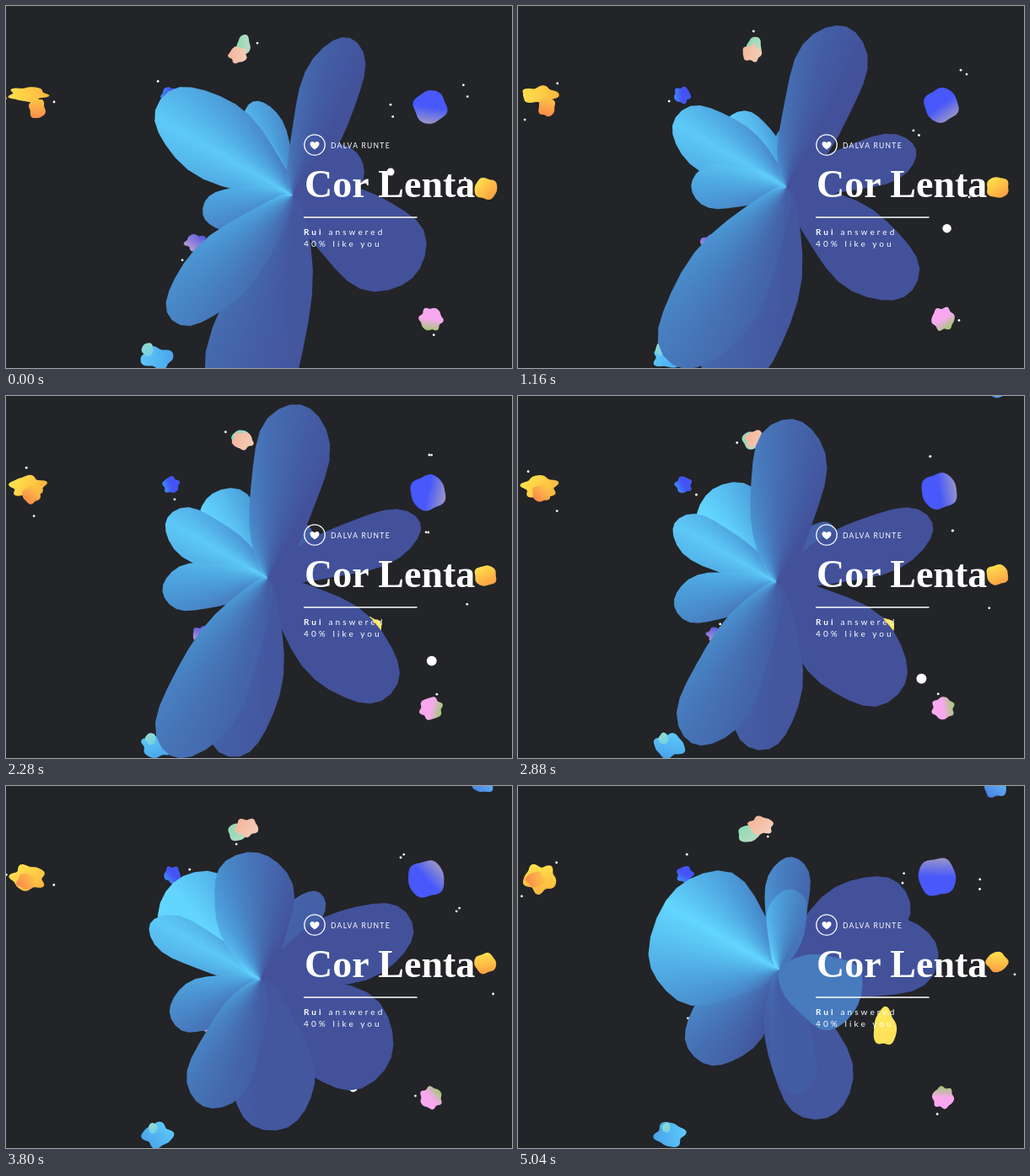
Recreate the animation shown at these times as an HTML page with a canvas. Size 600x430 px, loop 5080 ms.

```html
<!DOCTYPE html>
<html lang="en">
<head>
<meta charset="utf-8">
<style>
  html, body { margin: 0; width: 600px; height: 430px; overflow: hidden; background: #222427; }
  canvas, svg { position: absolute; left: 0; top: 0; display: block; }
  text { fill: #fff; font-family: Lato, "Open Sans", sans-serif; }
  .title { font: bold 46px "Liberation Serif", "Noto Serif", serif; }
  .artist { font-size: 8.5px; letter-spacing: 1.3px; }
  .note { font-size: 10px; letter-spacing: 3.1px; }
  .name { font-weight: bold; }
</style>
</head>
<body>
<canvas id="stage" width="600" height="430"></canvas>
<svg width="600" height="430" fill="#fff">
  <circle cx="366" cy="165" r="12.2" fill="none" stroke="#fff" stroke-width="1.3"/>
  <path d="M366 170.5C361 167 360.5 165 360.5 163.7C360.5 160.6 364.5 160 366 162.6C367.5 160 371.5 160.6 371.5 163.7C371.5 165 371 167 366 170.5Z"/>
  <text class="artist" x="385" y="168.5">DALVA RUNTE</text>
  <text class="title" x="354" y="227">Cor Lenta</text>
  <rect x="353" y="250.3" width="134.5" height="1.5"/>
  <text class="note" x="353" y="271.5"><tspan class="name">Rui</tspan> answered</text>
  <text class="note" x="353" y="286">40% like you</text>
</svg>
<script>
const ctx = document.getElementById('stage').getContext('2d');
const LOOP = 5080, TAU = Math.PI * 2, RAD = Math.PI / 180;
const { sin, cos, min, max } = Math;
const mix = (a, b, k) => a + (b - a) * k;

// Smooth curve through evenly spaced key poses; k runs from 0 to 1.
const keys = (...rows) => k => {
  const n = rows.length - 1, i = min(Math.floor(k * n), n - 1), u = k * n - i;
  const row = j => rows[min(max(j, 0), n)];
  return rows[i].map((b, j) => {
    const a = row(i - 1)[j], c = row(i + 1)[j], d = row(i + 2)[j];
    return b + u / 2 * (c - a + u * (2 * a - 5 * b + 4 * c - d + u * (3 * (b - c) + d - a)));
  });
};

// ---- flower: poses at each quarter of the loop are [angle, length, half width]
const center = keys([340, 225], [317, 215], [309, 218], [302, 230], [310, 218]);
const petals = [];
const petal = (lift, ...poses) => petals.push({ lift, pose: keys(...poses) });
const bud = (lift, a, len, w) => petal(lift, ...Array(4).fill([a, 0, 0]), [a, len, w]);

petal(-.15, [247, 121, 25], [275, 70, 20], [312, 85, 20], [304, 125, 25], [276, 135, 30]);
petal(-.2, [225, 120, 30], [233, 108, 32], [237, 125, 44], [228, 155, 56], [215, 110, 40]);
petal(0, [331, 92, 34], [344, 165, 33], [339, 196, 37], [339, 192, 48], [328, 176, 52]);
petal(0, [30, 174, 60], [40, 194, 50], [43, 200, 55], [36, 182, 66], [-7, 190, 52]);
petal(.08, [216, 194, 52], [212, 153, 40], [211, 138, 32], [207, 147, 28], [205, 110, 30]);
petal(.05, [168, 109, 28], [181, 114, 30], [170, 127, 32], [156, 116, 34], [134, 145, 47]);
petal(-.05, [103, 285, 63], [108, 245, 62], [100, 210, 46], [84, 180, 56], [72, 185, 52]);
petal(-.12, [134, 206, 42], [122, 252, 57], [118, 232, 48], [114, 165, 42], [80, 150, 30]);
petal(0, [290, 199, 39], [290, 204, 49], [278, 207, 50], [264, 152, 53], [202, 158, 90]);
bud(-.35, 279, 98, 27);
bud(-.4, 24, 104, 50);

// Colour depends on direction: bright at the upper left, indigo on the far side.
const RAMP = [[98, 214, 255], [76, 160, 220], [70, 114, 182], [66, 81, 154]];
function shade(angle, lift) {
  const d = (angle - 210 + 540) % 360 - 180;
  const p = 3 * min(max(min(d > 0 ? d / 85 : -d / 115, 1) + lift, 0), 1);
  const i = min(Math.floor(p), 2);
  return `rgb(${RAMP[i].map((c, j) => Math.round(mix(c, RAMP[i + 1][j], p - i)))})`;
}
function fan(x, y, lift) {
  const fill = ctx.createConicGradient(0, x, y);
  for (let a = 0; a <= 360; a += 15) fill.addColorStop(a / 360, shade(a, lift));
  return fill;
}

function drawFlower(k) {
  const [x, y] = center(k);
  disc(x, y, 42, fan(x, y, 0));
  petals.forEach(({ lift, pose }, id) => {
    const [angle, len, w] = pose(k);
    if (len < 1) return;
    const c = cos(angle * RAD), s = sin(angle * RAD);
    ctx.beginPath();
    for (let i = 0; i < 28; i++) {
      const q = i / 28 * TAU, along = (1 - cos(q)) / 2;
      const side = w * sin(q) * (.55 + .6 * along) * (1 + .06 * sin(4 * q + id * 2 + k * 4));
      ctx.lineTo(x + c * along * len - s * side, y + s * along * len + c * side);
    }
    ctx.fillStyle = fan(x, y, lift);
    ctx.fill();
  });
}

// ---- drifting blobs: first and last [x, y, half width, half height]
const blobs = [];
const blob = (colors, turn, lobes, bump, ...ends) =>
  blobs.push({ colors, turn, lobes, bump, at: keys(...ends) });
const SPIN = [1.7, -1.57];

blob(['#ffe14d', '#fdb73e'], [0, 1.5], 5, .12, [26, 105, 23, 9], [26, 110, 20, 17]);
blob(['#fdc545', '#fb8a4c'], [1.5, 2.8], 4, .08, [37, 122, 10, 12], [21, 111, 12, 9]);
blob(['#8fd9b4', '#b9dcc4'], [0, 1], 3, .08, [282, 46, 8, 12], [273, 57, 13, 10]);
blob(['#f5b79c', '#f3cdb8'], [0, 1], 5, .1, [275, 58, 11, 10], [288, 47, 15, 11]);
blob(['#3f8cf8', '#4453f5', '#4453f5'], [.2, -1], 5, .1, [194, 106, 10, 10], [198, 105, 10, 10]);
blob(['#4858fa', '#4858fa', '#9a96c8'], SPIN, 4, .05, [503, 120, 20, 20], [497, 108, 23, 23]);
blob(['#ffe04c', '#fca042'], [.8, 1.6], 4, .06, [569, 217, 14, 13], [568, 209, 13, 12]);
blob(['#f8a8ee', '#f8a8ee', '#9fca72'], SPIN, 6, .08, [504, 372, 14, 14], [504, 370, 13, 13]);
blob(['#5cc8f8', '#4aa4ec'], [0, 3], 4, .12, [179, 418, 20, 13], [180, 414, 18, 15]);
blob(['#8fdcd0', '#74d0e4'], [1, 1], 3, .06, [168, 408, 7, 8], [176, 406, 5, 6]);
blob(['#b79ad8', '#5b5cdc'], [-1, -2], 5, .12, [225, 281, 13, 10], [240, 285, 8, 8]);
blob(['#ffe95c', '#fde05a'], [1, 1], 3, .1, [433, 272, 9, 13], [435, 287, 14, 23]);
blob(['#4a84e4', '#62b8f4'], [0, -1], 4, .1, [566, -25, 12, 11], [566, 2, 14, 12]);

function drawBlob({ colors, turn, lobes, bump, at }, k) {
  const [x, y, rx, ry] = at(k), g = mix(...turn, k);
  const dx = cos(g) * rx, dy = sin(g) * ry;
  const fill = ctx.createLinearGradient(x - dx, y - dy, x + dx, y + dy);
  colors.forEach((c, i) => fill.addColorStop(i / (colors.length - 1), c));
  ctx.beginPath();
  for (let i = 0; i < 48; i++) {
    const a = i / 48 * TAU;
    const r = 1 + bump * (sin(lobes * a + x + k * 5) + .5 * sin((lobes + 2) * a - k * 4) - .4);
    ctx.lineTo(x + cos(a) * r * rx, y + sin(a) * r * ry);
  }
  ctx.fillStyle = fill;
  ctx.fill();
}

// ---- white satellites; wide orbits turn more slowly
function drawSparks(k, x, y, radius, count, phase) {
  for (let i = 0; i < count; i++) {
    const a = phase + i * 3.3 - k * 110 / radius * (1 + i * .12);
    disc(x + cos(a) * radius, y + sin(a) * radius, 1.4);
  }
}
const moon = keys([456, 197, 4.5], [511, 270, 5.3], [496, 324, 6], [411, 358, 5.5], [318, 349, 4]);

function disc(x, y, r, fill = '#fff') {
  ctx.beginPath();
  ctx.arc(x, y, r, 0, TAU);
  ctx.fillStyle = fill;
  ctx.fill();
}

const begin = performance.now();
function frame() {
  const k = (performance.now() - begin) % LOOP / LOOP;
  const moonInFront = k < .67;
  ctx.fillStyle = '#222427';
  ctx.fillRect(0, 0, 600, 430);
  blobs.forEach(b => drawBlob(b, k));
  drawSparks(k, 502, 116, 46, 4, -.5);
  drawSparks(k, 28, 114, 29, 2, 0);
  drawSparks(k, 279, 50, 20, 1, -.3);
  drawSparks(k, 197, 102, 21, 1, -2.5);
  drawSparks(k, 504, 372, 19, 1, 1.4);
  drawSparks(k, 562, 225, 27, 1, 4);
  drawSparks(k, 222, 284, 22, 1, 2.2);
  if (!moonInFront) disc(...moon(k));
  drawFlower(k);
  if (moonInFront) disc(...moon(k));
  requestAnimationFrame(frame);
}
frame();
</script>
</body>
</html>
```
